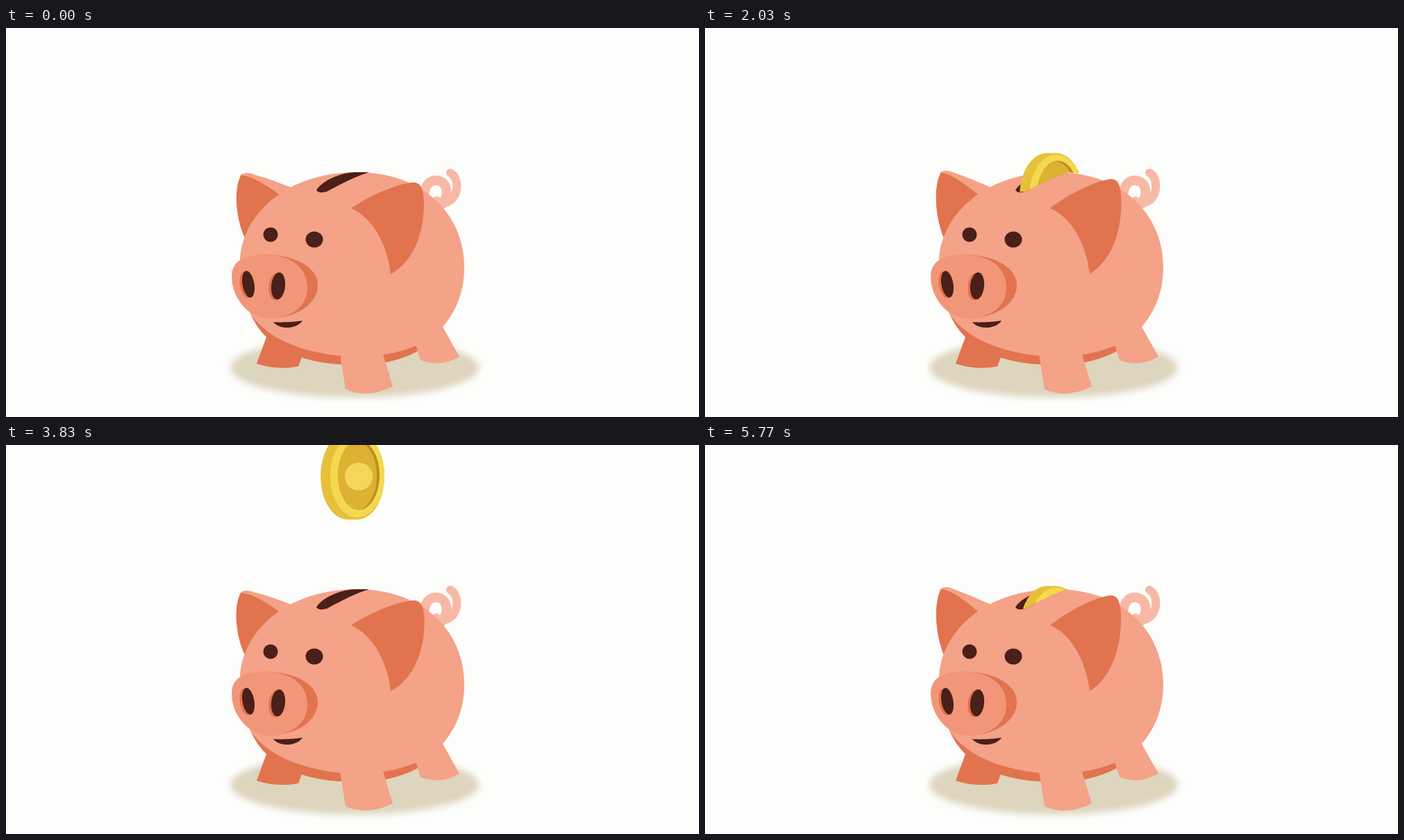
An HTML page with a canvas that plays this animation: 998x561 px, repeating every 5.81 s.

```html
<!DOCTYPE html>
<html lang="en">
<head>
<meta charset="utf-8">
<title>Piggy bank</title>
<style>
html, body { margin: 0; width: 100%; height: 100%; overflow: hidden; background: #fdfdfc; }
canvas { display: block; width: 998px; height: 561px; }
</style>
</head>
<body>
<canvas id="stage" width="998" height="561"></canvas>
<script>
const ctx = document.getElementById('stage').getContext('2d');
const LOOP = 5810, STEP = 100 / 3, LAST = 173, CYCLE = 22, HIT = 9;
const PINK = '#f4a288', DARK = '#e2734f', FACE = '#f2967a', BROWN = '#4a2018', TAIL = '#f7b9a5';
const GOLD = '#e6c03a', BRIGHT = '#f5d84e';

const BODY = 'M337 335C340 268 405 208 505 208C600 208 660 268 660 345C660 385 645 412 629 431' +
  'C610 455 570 470 520 474C450 476 380 455 352 412C340 390 336 360 337 335Z';
const BELLY = 'M352 412C375 465 430 486 505 486C565 486 610 465 629 431Z';
const SLOT_EDGE = 'L523 208C505 213 482 225 462 236';
const SLOT = `M447 234C455 220 484 208 503 208${SLOT_EDGE}Q450 239 447 234Z`;
const ABOVE_SLOT = `M400 0L620 0L620 216L560 212${SLOT_EDGE}L400 240Z`;
const FRONT_EAR = 'M497 260C520 245 560 227 588 225C600 226 602 236 603 250' +
  'C604 290 592 335 554 355C550 315 530 275 497 260Z';
const BACK_EAR = 'M392 239C372 226 355 215 338 214C327 232 330 275 344 303L400 300Z';
const BACK_EAR_RIM = 'M336 216C340 209 350 210 358 213C376 217 392 223 410 230L400 260Z';
const SNOUT_SIDE = 'M365 327C415 325 449 345 449 371C449 397 420 418 378 419Z';
const SNOUT = 'M325 358C325 335 345 327 372 327C410 327 434 345 434 375C434 402 410 419 378 419C352 419 325 392 325 358Z';
const FAR_LEG = 'M376 443L361 484Q390 494 421 488L427 472Z';
const FRONT_LEG = 'M480 464L489 521Q520 535 557 517L541 464Z';
const BACK_LEG = 'M590 457L597 479Q625 490 653 474L629 431Z';
const CURL = 'M603 236C606 215 630 215 634 232C636 242 632 248 628 254';
const CURL_END = 'M640 209C653 215 653 244 636 251C630 254 624 252 620 249';

const clamp = v => Math.max(0, Math.min(1, v));

// The coin falls, rests on the slot, then sinks at a steady pace.
const coinTop = n => Math.min(28.5 * n - 160, Math.max(123, 123 + 11.5 * (n - 12)));

// One quick press with a slower recovery.
const squashAt = n => Math.sin(Math.PI * clamp((n - HIT) / 8) ** .7);

// The ears swing on after each hit and die away.
function earDropAt(n) {
  const u = (n < HIT ? n + CYCLE : n) - 12;
  return 1.1 * Math.exp(-.18 * u) * Math.cos(Math.PI * (u - .5) / 6.5) - .1;
}

// Presses a point towards the ground and outwards.
const press = s => (x, y) => [
  x + .0526 * s * (x - 489) * clamp((486 - y) / 140),
  y + 16 * s * Math.max(0, (486 - y) / 279) ** 1.4
];

// Swings a point by its distance from the ear's root line.
function flap(x0, y0, x1, y1, reach, dx, dy) {
  const length = Math.hypot(x1 - x0, y1 - y0);
  return (x, y) => {
    const away = Math.abs((x1 - x0) * (y - y0) - (y1 - y0) * (x - x0)) / length;
    const w = clamp(away / reach);
    return [x + dx * w, y + dy * w];
  };
}

const moved = (path, move) =>
  path.replace(/([\d.]+) ([\d.]+)/g, (_, x, y) => move(+x, +y).map(v => v.toFixed(2)).join(' '));

function oval(x, y, rx, ry, color, tilt = 0) {
  ctx.fillStyle = color;
  ctx.beginPath();
  ctx.ellipse(x, y, rx, ry, tilt, 0, 7);
  ctx.fill();
}

function coin(top) {
  ctx.save();
  ctx.translate(0, top);
  oval(492, 62.5, 39, 62.5, GOLD);
  ctx.fillStyle = GOLD;
  ctx.fillRect(492, 0, 14, 125);
  oval(506, 62.5, 39, 62.5, GOLD);
  oval(506, 62, 39, 60, BRIGHT);
  oval(508, 61, 30, 50, '#b98f22');
  ctx.beginPath();
  ctx.ellipse(508, 61, 30, 50, 0, 0, 7);
  ctx.clip();
  oval(504, 62, 30, 50, '#ddb232');
  oval(508, 63, 20, 20, '#f5d65a');
  ctx.restore();
}

function draw(n) {
  const s = squashAt(n), d = earDropAt(n), pressed = press(s);
  const path = p => new Path2D(moved(p, pressed));
  const fill = (p, color) => {
    ctx.fillStyle = color;
    ctx.fill(path(p));
  };
  const line = (p, width) => {
    ctx.strokeStyle = TAIL;
    ctx.lineWidth = width;
    ctx.lineCap = 'round';
    ctx.stroke(path(p));
  };
  const spot = (x, y, rx, ry, color, tilt) => oval(...pressed(x, y), rx, ry, color, tilt);
  const eye = (x, y, rx, ry) => spot(x, y + 5 * s, rx + 3 * s, ry - 4.4 * s, BROWN, .07 * s);
  const nostril = (x, y, rx, tilt) => {
    const ry = 19.5 - 1.5 * s;
    spot(x - 3.5, y + 1, rx, ry, DARK, tilt);
    spot(x, y, rx, ry, BROWN, tilt);
  };

  ctx.fillStyle = '#fdfdfc';
  ctx.fillRect(0, 0, 998, 561);
  ctx.filter = 'blur(5px)';
  oval(502, 490, 179, 43, '#ddd5bd');
  ctx.filter = 'none';

  fill(FAR_LEG, DARK);
  line(CURL, 14);
  line(CURL_END, 12);
  const backFlap = flap(392, 239, 344, 303, 58, -5 * d, 15 * d);
  fill(moved(BACK_EAR_RIM, backFlap), PINK);
  fill(moved(BACK_EAR, backFlap), DARK);
  fill(BELLY, DARK);
  fill(BODY, PINK);
  fill(SLOT, BROWN);

  ctx.save();
  // Stretch the clip's top beyond the stage so that it never cuts the coin.
  ctx.clip(new Path2D(moved(ABOVE_SLOT, (x, y) => y ? pressed(x, y) : [x, y])));
  coin(coinTop(n));
  ctx.restore();

  fill(moved(FRONT_EAR, flap(497, 260, 554, 355, 104, 11 * d, 22 * d)), DARK);
  fill(SNOUT_SIDE, DARK);
  fill(SNOUT, FACE);
  nostril(349, 369.5, 8.5, -.17);
  nostril(392, 372, 10, .1);
  eye(381, 298, 10.5, 10.5);
  eye(444, 305, 12.5, 11.5);

  const left = `${385 + 3 * s} ${424 + 6 * s}`, right = `${427 - 10 * s} ${422 + 8 * s}`;
  ctx.fillStyle = BROWN;
  ctx.fill(new Path2D(`M${left}C395 425 ${415 - 5 * s} 424 ${right}` +
    `C${420 - 10 * s} ${434 + 2 * s} 394 436 ${left}Z`));

  fill(BACK_LEG, PINK);
  fill(FRONT_LEG, PINK);
}

const start = performance.now();
function tick() {
  const t = (performance.now() - start) % LOOP;
  draw(Math.min(LAST, Math.floor((t + 3.4) / STEP)) % CYCLE);
  requestAnimationFrame(tick);
}
tick();
</script>
</body>
</html>
```
